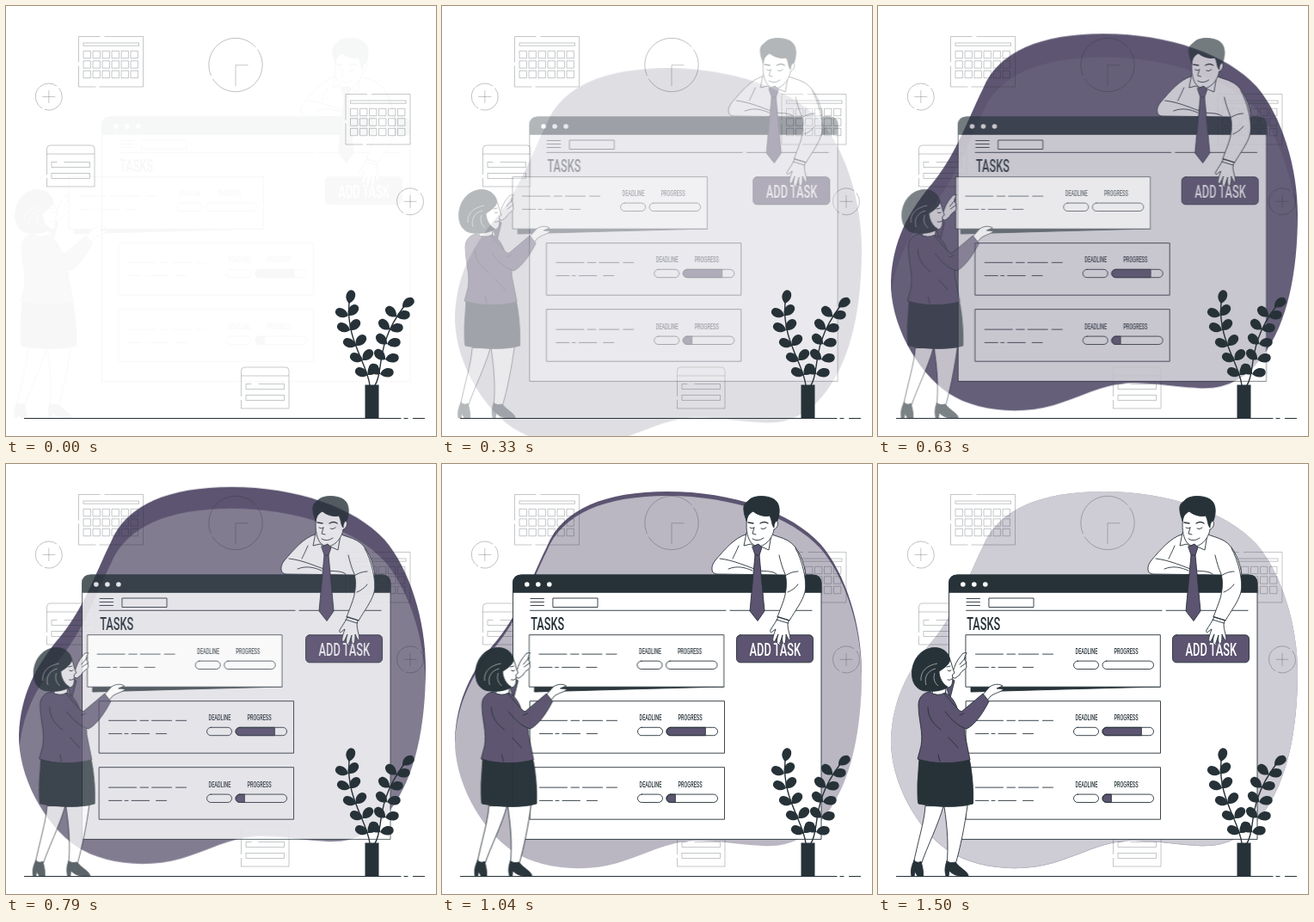
Animation, 500 px wide and 500 px high, one loop 1540 ms. Source, as an HTML page:

```html
<!DOCTYPE html>
<html lang="en">
<head>
<meta charset="utf-8">
<title>Add task</title>
<style>
  html, body { margin: 0; width: 100%; height: 100%; overflow: hidden; background: #fff; }
  svg { display: block; width: 100vw; height: 100vh; }

  .ink { fill: #263238; }
  .violet { fill: #5c5470; }
  .paper { fill: #fff; }
  .line { fill: none; }
  .drawn { stroke: #263238; stroke-width: .9; stroke-linecap: round; stroke-linejoin: round; }
  .decor { fill: none; stroke: #263238; stroke-opacity: .3; stroke-width: .9; }
  .thin { fill: none; stroke: #fff; stroke-width: .5; }

  text {
    font-family: Roboto, "Liberation Sans", sans-serif;
    font-weight: 500;
    fill: #263238; stroke: none;
    transform: scaleX(.62); transform-box: fill-box; transform-origin: left;
  }
  .label { font-size: 9px; }
  .title { font-size: 20.5px; }
  .button { font-size: 20.7px; fill: #fff; }

  .blob, .veil, .window, .woman { animation: 1540ms linear infinite; }
  .blob { animation-name: rise; }
  .veil { animation-name: veil; }
  .window { animation-name: from-right; }
  .woman { animation-name: from-left; }

  @keyframes rise {
    0%, 10.7% { opacity: 0; transform: translateY(50px); animation-timing-function: cubic-bezier(.36, -.01, .5, 1.52); }
    59.74%, 100% { opacity: 1; transform: none; }
  }
  @keyframes veil {
    0%, 30.5% { opacity: 0; transform: translateY(30px); animation-timing-function: cubic-bezier(.36, -.01, .5, 1.38); }
    98%, 100% { opacity: .7; transform: none; }
  }
  @keyframes from-right {
    0% { opacity: .0385; transform: translateX(28.85px); }
    64.94%, 100% { opacity: 1; transform: none; }
  }
  @keyframes from-left {
    0% { opacity: .0364; transform: translateX(-28.9px); }
    68.83%, 100% { opacity: 1; transform: none; }
  }
</style>
</head>
<body>
<svg viewBox="0 0 500 500">
  <defs>
    <path id="shape" d="M15 320C17 272 36 240 58 212C90 176 104 132 122 96C140 52 190 32 262 32C338 32 406 56 440 93C470 128 488 188 488 242C488 310 476 368 448 406C428 434 404 446 372 444C340 442 322 438 294 438C258 440 238 454 204 464C162 476 112 470 82 450C44 424 14 368 15 320Z"/>

    <g id="week">
      <path id="days" d="M0 0h8.4v8.4h-8.4zM11 0h8.4v8.4h-8.4zM22 0h8.4v8.4h-8.4z"/>
      <use href="#days" x="33"/>
    </g>
    <g id="calendar">
      <path d="M25 0H0V30M0 34V58.5H20M24 58.5H75V0H30"/>
      <rect x="5.5" y="7.5" width="64.5" height="3.2"/>
      <use href="#week" x="5.5" y="16.8"/>
      <use href="#week" x="5.5" y="28.3"/>
      <use href="#week" x="5.5" y="39.8"/>
    </g>
    <g id="note">
      <path d="M0 34V4Q0 0 4 0H51.5Q55.5 0 55.5 4V48H0V38M0 10H55.5"/>
      <path d="M12 19.5H5.5V25.5H50V19.5H20"/>
      <rect x="5.5" y="32.5" width="44.5" height="6"/>
    </g>
    <g id="plus">
      <circle r="15.5" stroke-dasharray="40 3 50 4.39" transform="rotate(-40)"/>
      <path d="M-7.5 0H7.5M0-7.5V7.5"/>
    </g>

    <rect id="card" class="paper drawn" width="226" height="60.5"/>
    <g id="task" class="drawn">
      <path class="line" d="M11 22.3H43M47.5 22.3H57M61 22.3H84M89 22.3H101M11 37.6H26M29.5 37.6H33.5M37.5 37.6H58M66 37.6H78"/>
      <text class="label" x="127" y="22">DEADLINE</text>
      <text class="label" x="172" y="22">PROGRESS</text>
      <rect class="line" x="125" y="30.3" width="29" height="9.4" rx="4.7"/>
      <rect class="line" x="158.5" y="30.3" width="59.5" height="9.4" rx="4.7"/>
    </g>

    <path id="leaf" d="M0 0C3-6 9-8 14-5C16.500-3 16.500 1 13.500 3C9 5.500 4 4 0 0Z"/>
    <g id="pair-left">
      <use href="#leaf" transform="rotate(208)"/>
      <use href="#leaf" transform="rotate(-42)"/>
    </g>
    <g id="pair-right">
      <use href="#leaf" transform="rotate(228)"/>
      <use href="#leaf" transform="rotate(-4)"/>
    </g>
  </defs>

  <use href="#shape" class="blob violet"/>
  <use href="#shape" class="veil paper"/>

  <g class="decor">
    <use href="#calendar" x="84.5" y="35.5"/>
    <use href="#calendar" x="395" y="102.5"/>
    <use href="#note" x="47.5" y="162"/>
    <use href="#note" x="273.5" y="420"/>
    <use href="#plus" x="49.8" y="105.5"/>
    <use href="#plus" x="470" y="227.3"/>
    <circle cx="267" cy="68.5" r="31.2" stroke-dasharray="100 4 88 4.04" transform="rotate(-35 267 68.5)"/>
    <path d="M267 93V68.8H281.5"/>
  </g>

  <path class="drawn line" style="stroke-width:1.2" d="M21.5 479.5H459M463 479.5H467M473.5 479.5H486.5"/>

  <g class="window">
    <g class="drawn">
      <path class="paper" d="M82.5 436V139Q82.5 129 92.5 129H431Q441 129 441 139V436Z"/>
      <path class="ink" d="M82.5 149V139Q82.5 129 92.5 129H431Q441 129 441 139V149Z"/>
      <path class="line" d="M103 156.5H118.5M103 160.5H118.5M103 164.5H118.5M102.5 170.3H330M335 170.3H430"/>
      <rect class="line" x="129.3" y="156" width="51.7" height="10.5"/>
    </g>
    <g class="paper">
      <circle cx="98.8" cy="140" r="2.8"/>
      <circle cx="111.8" cy="140" r="2.8"/>
      <circle cx="124.8" cy="140" r="2.8"/>
    </g>
    <text class="title" x="103.3" y="193.5">TASKS</text>

    <use href="#card" x="102.5" y="275.7"/>
    <use href="#card" x="102.5" y="352.7"/>
    <g class="violet drawn">
      <path d="M306 306.3H265.7A4.7 4.7 0 0 0 265.7 315.7H306Z"/>
      <path d="M271 384.1H265.7A4.7 4.7 0 0 0 265.7 393.5H271Z"/>
      <rect x="342.5" y="198.8" width="89" height="32" rx="4.5"/>
    </g>
    <use href="#task" x="102.5" y="276"/>
    <use href="#task" x="102.5" y="353.8"/>
    <text class="button" x="357.5" y="222.7">ADD TASK</text>

    <!-- man -->
    <g class="paper drawn">
      <path d="M353 82C340 86 329 99 317 113C312 120 313 128 320 128L400 129L423 130C422 116 414 95 402 89C395 85 387 84 382 81Z"/>
      <path d="M392 106C394 115 396 121 399 128C402 138 400 152 396 162L390 178L404 182C411 170 419 160 422 149C425 137 419 112 411 98"/>
      <path d="M391 178C388 184 385 188 382 193C381 196 383 197 385 194L388 192C386 198 384 203 385 206C387 208 388 204 391 198C389 204 389 209 391 210C393 210 394 204 396 199C395 205 396 210 398 209C400 208 400 202 400 198C402 203 404 206 405 204C405 199 402 193 402 187L403 182Z"/>
      <path class="line" d="M390 178L404 182M389 181L402 185M323 110C340 112 354 119 369 124C377 125 384 124 389 128M333 122C343 118 352 120 361 124M345 95C342 102 340 106 338 110M399 130C405 126 410 125 414 125M402 149C407 147 411 144 414 140"/>
      <path d="M354 80L351 95L359 93L366 98L371 96L380 100L383 82Z"/>
      <path d="M355 61C353 72 354 84 359 91C364 97 371 97 377 92C382 88 385 82 386 76C392 74 392 64 386 65L384 52H360Z"/>
      <path class="line" d="M358 74Q361 76 363 74M371 75Q374 77 377 74M363 74L361 81L365 82M361 87Q367 91 374 86"/>
      <path class="line" stroke-width="1.3" d="M356 68L362 69M370 69Q375 66 379 69"/>
      <path class="ink" d="M354 66C353 62 351 58 351 54C350 48 353 45 356 43C361 36 378 36 386 41C394 46 393 58 390 66C388 66 386 69 386 74C383 71 384 65 381 60C376 62 366 59 362 55C358 57 355 60 354 66Z"/>
      <path class="violet" d="M361 96L368 93L372 97L369 106L375 171L367 182.5L358 171L364 106Z"/>
      <path class="line" d="M364 106L369 106"/>
    </g>
  </g>

  <!-- woman with her card -->
  <g class="woman">
    <path class="violet drawn" d="M80 260L86 250L89 252L84 272Z"/>
    <path class="ink drawn" d="M108 259V265L215 262L328 259Z"/>
    <use href="#card" x="102.3" y="198.7"/>
    <use href="#task" x="102.5" y="198.8"/>
    <g class="paper drawn">
      <path d="M85 247C88 240 89 233 94 226L99 220L103 219.5C100 225 100 228 102 229L103 236C101 240 97 240 95 245L90 249Z"/>
      <path class="line" d="M95 233L102 225M96 236L103 231"/>
      <path d="M55 398C54 416 46 440 41 466H50C57 445 70 420 76 398Z"/>
      <path d="M77 398C81 425 82 445 80 466H90C96 445 101 420 104 397Z"/>
      <path d="M66 252L62 272L78 274L79 258Z"/>
      <path d="M68 234L83 226C86 231 86 237 89 243L86.5 245C87 250 87 255 85 258C81 262 74 260 68 256Z"/>
      <path class="line" d="M80 236L84 235M81 240Q83 242 85 240M81 251Q84 252 86 250"/>
      <path d="M122 268L130 259C136 255 142 256 145 258L138 261L146 261.5C144 265 136 266 131 270L127 275Z"/>
    </g>
    <g class="ink drawn">
      <path d="M48 342L46 372C46 385 46 392 47 395C68 399 94 400 110.500 395C111 380 110 360 106 342Z"/>
      <path d="M42 461C38 469 38 475 39 479H42L43 474L46 479H52.5C53 472 51 466 50 462Q46 465 42 461Z"/>
      <path d="M80 462C77 470 78 475 79 479H82L83 473C88 478 93 480 105 479C105 474 95 470 90 463Q85 465 80 462Z"/>
      <path d="M62 214C48 216 39 230 39.5 245C40 257 47 264 57 264C67 265 77 263 81 259C75 256 71 248 71 241C78 237 85 231 83.5 226C81 217 72 212 62 214Z"/>
    </g>
    <path class="thin" d="M50 252C49 241 57 234 69 232M56 257C53 248 58 240 67 238M70 258C65 254 64 248 66 243"/>
    <g class="violet drawn">
      <path d="M60 265C52 266 47 272 47 280C47 298 53 312 50 328L46 343C64 349 88 349 107 344L101 314C102 307 97 300 94 290C91 278 86 270 78 266Q69 271 60 265Z"/>
      <path d="M77 267C85 275 90 284 97 288L122 267L129 276C122 290 112 304 103 308C93 305 85 297 78 288"/>
      <path class="line" d="M58 283C58 295 65 303 73 309M82 318L93 330M70 338L72 346M95 292L100 290"/>
    </g>
  </g>

  <!-- plant -->
  <g class="ink">
    <rect x="417.5" y="440.5" width="16" height="39"/>
    <path class="drawn line" style="stroke-width:1.4" d="M423 441C420 415 395 388 399 345M429 441C440 425 428 395 463 349"/>
    <use href="#leaf" transform="translate(399 346) rotate(-72)"/>
    <use href="#pair-left" x="398" y="360"/>
    <use href="#pair-left" x="400" y="377"/>
    <use href="#pair-left" x="407" y="395"/>
    <use href="#pair-left" x="415" y="412"/>
    <use href="#pair-left" x="421" y="429"/>
    <use href="#leaf" transform="translate(461 350) rotate(-30)"/>
    <use href="#pair-right" x="454" y="361"/>
    <use href="#pair-right" x="446" y="376"/>
    <use href="#pair-right" x="443" y="393"/>
    <use href="#pair-right" x="441" y="411"/>
    <use href="#pair-right" x="435" y="428"/>
  </g>
</svg>
</body>
</html>
```
